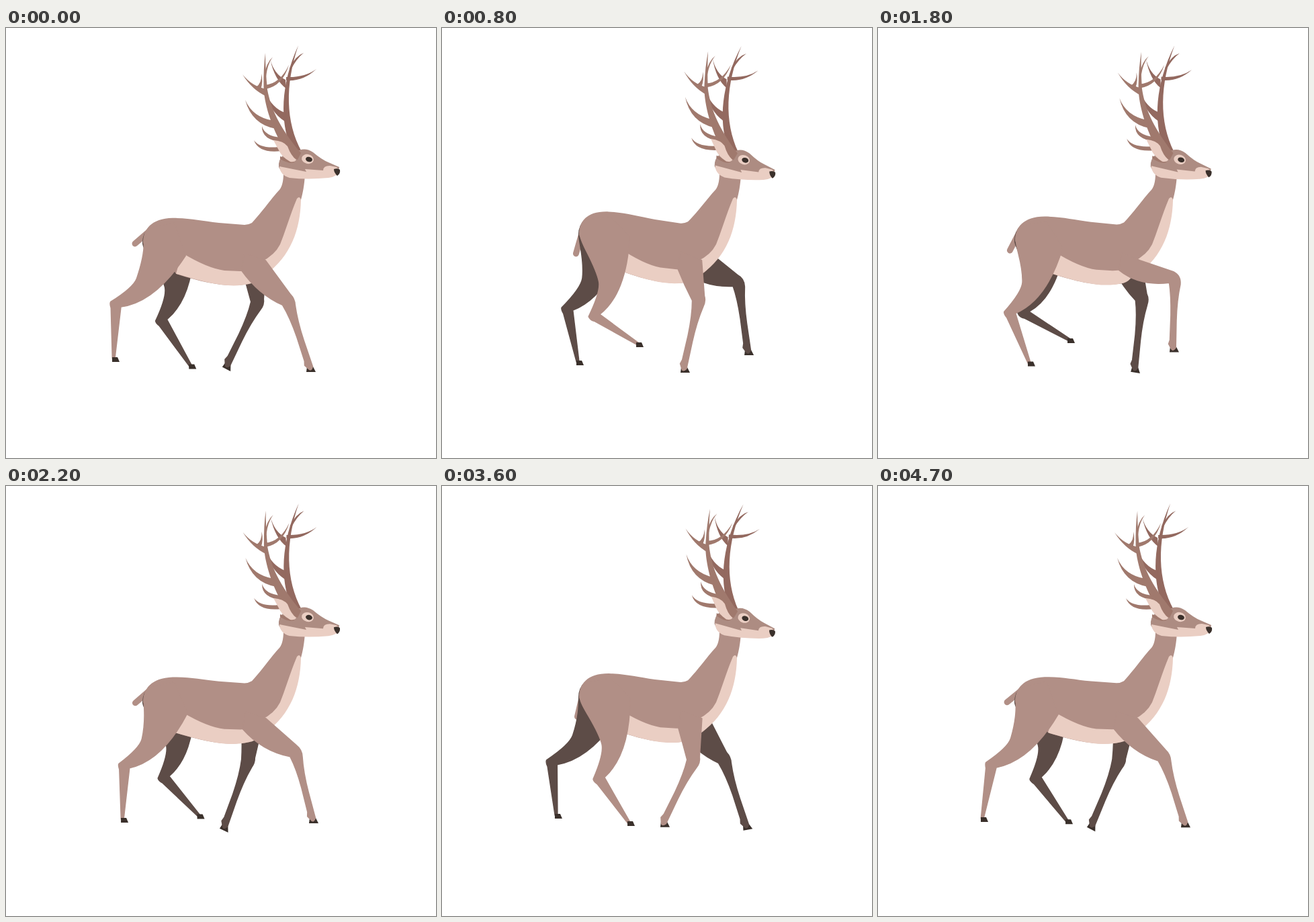
An HTML page that plays this animation: 640x640 px, repeating every 4.8 s.

```html
<!DOCTYPE html>
<html lang="en">
<head>
<meta charset="utf-8">
<title>Walking deer</title>
<style>
  html, body { margin: 0; width: 100%; height: 100%; overflow: hidden; background: #fff; }
  svg { display: block; width: 100%; height: 100%; }
</style>
</head>
<body>
<svg viewBox="0 0 640 640">
  <path id="tail" fill="none" stroke="#b18f86" stroke-width="9" stroke-linecap="round"/>
  <g id="far"></g>
  <path id="body" fill="#b18f86"/>
  <path id="belly" fill="#eacec3"/>
  <path id="chest" fill="#eacec3"/>
  <g id="near"></g>
  <g id="head">
    <g fill="#93695f">
      <path d="M424 178C408 140 408 85 435 26C415 85 416 140 440 184Z"/>
      <path d="M393 46Q399 69 416 77L417 90Q400 78 393 46Z"/>
      <path d="M417 73Q445 74 462 61Q442 80 417 78Z"/>
      <path d="M422 60Q430 42 443 37Q432 46 424 62Z"/>
      <path d="M386 96Q396 119 415 126V139Q394 126 386 96Z"/>
    </g>
    <path fill="#ad8c82" d="M406 207Q405 196 412 190L437 182Q446 178 457 185Q470 196 480 200L496 207L494 218L440 222L410 214Z"/>
    <path fill="#eacec3" d="M407 206L447 214L445 210L472 212Q472 205 482 205L492 207L497 213Q494 221 480 223Q450 226 422 223Q408 219 407 206Z"/>
    <path fill="#3a302b" d="M488 210Q494 208 497 211Q498 217 493 220Q488 215 488 210Z"/>
    <ellipse cx="449" cy="195" rx="9" ry="7" fill="#eacec3" transform="rotate(14 449 195)"/>
    <ellipse cx="451" cy="195.5" rx="5" ry="3.7" fill="#3a302b" transform="rotate(14 451 195.5)"/>
    <g fill="#a0796d">
      <path d="M428 194L408 169C395 145 384 112 383.5 88Q383 60 386 37Q386 62 389 92C394 118 405 146 439 186L434 196Z"/>
      <path d="M352 69Q366 87 388 91V102Q366 92 352 69Z"/>
      <path d="M380 68Q381 82 372 88L379 92Q383 80 380 68Z"/>
      <path d="M356 107Q367 133 398 138L402 150Q366 144 356 107Z"/>
      <path d="M369 167Q378 180 406 177L410 183Q376 187 369 167Z"/>
      <path d="M381 146Q385 161 409 163L412 170Q380 167 381 146Z"/>
      <path d="M385 85Q408 83 421 55Q412 86 386 91Z"/>
      <path d="M384 72Q387 52 397 43Q389 54 387 72Z"/>
      <path d="M408 191L430 199Q424 204 408 195Z"/>
    </g>
    <path fill="#eacec3" d="M398 167Q413 168 419 176Q424 190 432 196Q430 200 423 199Q410 192 405 180Z"/>
  </g>
</svg>
<script>
const CYCLE = 2400, STEP = 100;

// Key poses of one stride, shared by both sides: time, joint x y, ankle x y
const hindStride = [
  [0, 163, 411, 160, 492], [200, 168, 413, 207, 482], [400, 193, 415, 258, 462],
  [800, 226, 428, 291, 470], [1200, 233, 435, 278, 501], [1500, 208, 430, 248, 500],
  [2050, 186, 418, 202, 497], [2300, 168, 415, 155, 495]];
const foreStride = [
  [0, 420, 408, 452, 504], [400, 402, 404, 404, 504], [800, 382, 406, 360, 505],
  [1100, 358, 410, 319, 503], [1400, 422, 403, 374, 490], [1600, 438, 377, 416, 475],
  [2000, 441, 379, 455, 479], [2200, 431, 398, 456, 494]];

const bodyShape = 'M204 320C204 300 216 284 248 283C275 283 290 287 317 290L355 293Q361 293 366 290' +
  'C380 275 395 254 405 243Q413 236 413 216L445 218C444 236 441 250 437 262' +
  'C432 300 418 342 388 366L362 381C330 386 300 381 253 366L235 340Q206 330 204 320Z';
const bellyShape = 'M262 335Q300 358 325 361L349 362L362 361L376 373Q370 380 361 381C335 387 305 382 253 366Z';
const chestShape = 'M433 254Q437 249 439 256C438 300 424 340 386 367L380 348Q400 338 408 322C415 305 424 275 433 254Z';

const $ = id => document.getElementById(id);
const txt = (x, y) => x.toFixed(2) + ' ' + y.toFixed(2);

// Periodic cubic interpolation through unevenly spaced poses
function pose(keys, time) {
  const n = keys.length, t = time % CYCLE;
  const key = i => {
    const [at, ...values] = keys[(i + n) % n];
    return [at + Math.floor(i / n) * CYCLE, ...values];
  };
  let i = n - 1;
  while (keys[i][0] > t) i--;
  const [a, b, c, d] = [-1, 0, 1, 2].map(k => key(i + k));
  const h = c[0] - b[0], s = (t - b[0]) / h, s2 = s * s, s3 = s2 * s;
  const [, jx, jy, ax, ay] = b.map((v, j) => {
    const m0 = (c[j] - a[j]) / (c[0] - a[0]) * h;
    const m1 = (d[j] - b[j]) / (d[0] - b[0]) * h;
    return v * (2 * s3 - 3 * s2 + 1) + m0 * (s3 - 2 * s2 + s) + c[j] * (3 * s2 - 2 * s3) + m1 * (s3 - s2);
  });
  return { joint: [jx, jy], ankle: [ax, ay] };
}

// Coordinates along a bone: y runs from o to p, x to its right
function bone(o, p, restLength) {
  const dx = p[0] - o[0], dy = p[1] - o[1], len = Math.hypot(dx, dy);
  const ux = dx / len, uy = dy / len, k = len / restLength;
  const at = (x, y) => txt(o[0] + uy * x + ux * y * k, o[1] - ux * x + uy * y * k);
  return { at, ux, uy };
}

// Points across the joint, square to a weighted mean of both bones
function across(joint, upper, lower, weight) {
  const x = upper.ux * weight + lower.ux, y = upper.uy * weight + lower.uy, l = Math.hypot(x, y);
  return w => [joint[0] + y / l * w, joint[1] - x / l * w];
}

function addPath(parent, color) {
  const el = document.createElementNS('http://www.w3.org/2000/svg', 'path');
  for (const [name, value] of Object.entries({ fill: color, stroke: color, 'stroke-linejoin': 'round' }))
    el.setAttribute(name, value);
  parent.append(el);
  return el;
}

function makeLeg(side, color, isFore) {
  const hoof = addPath($(side), '#3a302b');
  hoof.setAttribute('stroke-width', 0);
  const limb = addPath($(side), color);
  limb.setAttribute('stroke-width', 1.5);
  if (!isFore) $(side).append(hoof);
  return { limb, hoof };
}

const legs = {
  farFore: makeLeg('far', '#5d4c47', true),
  farHind: makeLeg('far', '#5d4c47', false),
  nearHind: makeLeg('near', '#b18f86', false),
  nearFore: makeLeg('near', '#b18f86', true)
};

function drawHoof(el, shape, ankle, angle = 0) {
  el.setAttribute('d', shape);
  el.setAttribute('transform', `translate(${txt(...ankle)}) rotate(${angle.toFixed(2)})`);
}

function drawHind(leg, time, bend, shift) {
  const { joint, ankle } = pose(hindStride, time);
  const thigh = bone(bend(238, 308), joint, 127.6);
  const shin = bone(joint, ankle, 80);
  const side = across(joint, thigh, shin, 2.5);
  const back = txt(...side(-8)), front = txt(...side(9));
  const b = (x, y) => txt(...bend(x + shift, y));
  leg.limb.setAttribute('d',
    `M${b(250, 290)}L${b(215, 297)}Q${b(205, 306)} ${b(205, 320)}` +
    `C${b(205, 333)} ${thigh.at(-5, 52)} ${thigh.at(3, 78)}Q${thigh.at(7, 92)} ${back}` +
    `Q${shin.at(-9, -1)} ${shin.at(-6.5, 6)}L${shin.at(-1.7, 80)}L${shin.at(2, 80)}L${front}` +
    `C${thigh.at(32, 104)} ${thigh.at(45, 65)} ${thigh.at(42, 8)}Z`);
  drawHoof(leg.hoof, 'M-2 -2H6L9 5H-2Z', ankle);
}

function drawFore(leg, time, bend, [topX, topY], hoofAngle) {
  const { joint, ankle } = pose(foreStride, time);
  const upper = bone([372, 340], joint, 80);
  const shin = bone(joint, ankle, 98);
  const side = across(joint, upper, shin, 1);
  // The shoulder slides forward as the knee folds
  const slide = 15 * (1 - upper.ux * shin.ux - upper.uy * shin.uy);
  const rear = bend(350 + slide, 361), back = side(-9.5);
  const sag = .22 * (back[0] - 366);
  const mid = txt((rear[0] + back[0] - sag) / 2, (rear[1] + back[1]) / 2 + sag);
  leg.limb.setAttribute('d',
    `M${txt(...bend(354 + slide, 335))}L${txt(...rear)}Q${mid} ${txt(...back)}` +
    `C${shin.at(-6, 16)} ${shin.at(-4.5, 32)} ${shin.at(-4.3, 52)}L${shin.at(-4.7, 88)}L${shin.at(-6.5, 94)}` +
    `L${shin.at(-3, 100)}Q${shin.at(0, 106)} ${shin.at(4.3, 99)}L${shin.at(4, 60)}` +
    `C${shin.at(4, 35)} ${shin.at(6, 20)} ${shin.at(8.5, 7)}Q${txt(...side(11))} ${upper.at(9.5, 73)}` +
    `L${txt(...bend(topX + slide / 2, topY))}Z`);
  drawHoof(leg.hoof, 'M-4 0H5L9 8H-5Z', ankle, hoofAngle);
}

function draw(t) {
  const a = 2 * Math.PI * t / CYCLE, { sin, cos } = Math;
  const lift = 4.7 - 2 * cos(a) + 4.6 * sin(a) - 2.5 * cos(2 * a) + 1.2 * sin(2 * a);
  const sway = (1 - cos(a + .08)) / 2;
  const opposite = t + CYCLE / 2;

  // The back rises at the hips and stays level at the chest
  const bend = (x, y) => [x, y - lift * Math.max(0, 390 - x) / 146];
  const bent = path => path.replace(/([\d.]+) ([\d.]+)/g, (m, x, y) => txt(...bend(+x, +y)));

  $('body').setAttribute('d', bent(bodyShape));
  $('belly').setAttribute('d', bent(bellyShape));
  $('chest').setAttribute('d', bent(chestShape));
  $('tail').setAttribute('d',
    `M${txt(...bend(212, 304))}L${txt(192 + 9.5 * sway, 321 + 24 * sway - .4 * lift)}`);

  drawFore(legs.farFore, opposite, bend, [388, 328], 9 + 19 * cos(a));
  drawHind(legs.farHind, opposite + 50, bend, -1.3);
  drawHind(legs.nearHind, t, bend, .5);
  drawFore(legs.nearFore, t, bend, [386, 346], 0);

  $('head').setAttribute('transform', `rotate(${(4.5 * sway).toFixed(3)} 430 200)`);
}

const start = performance.now();
function tick() {
  const t = Math.max(0, performance.now() - start);
  draw(Math.floor(t / STEP) * STEP % CYCLE);
  requestAnimationFrame(tick);
}
tick();
</script>
</body>
</html>
```
